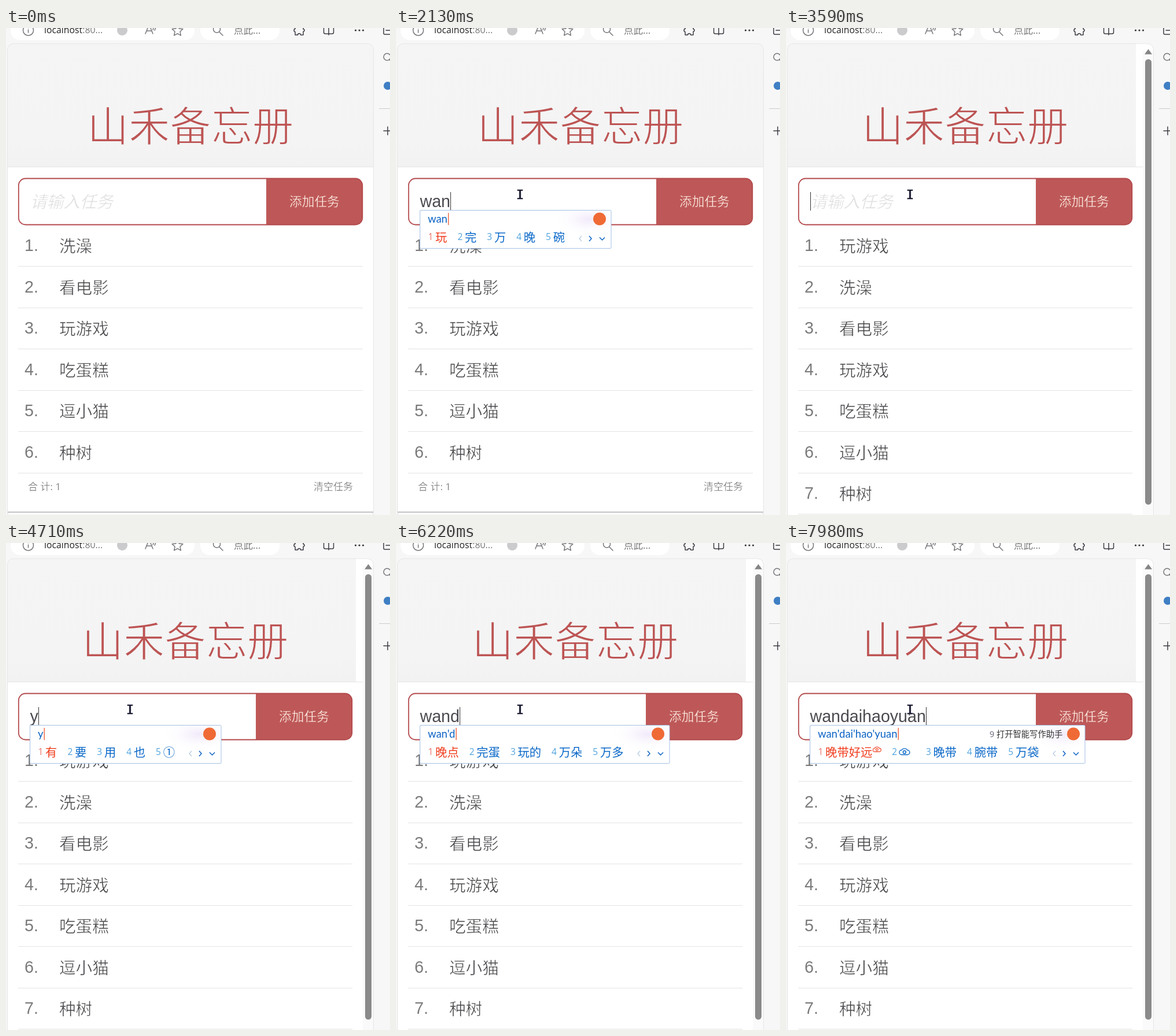
These frames come from a looping animation (664 by 843 pixels, 8 s). An HTML page:

```html
<!DOCTYPE html>
<html lang="zh-CN">
<head>
<meta charset="utf-8">
<title>待办清单</title>
<style>
html, body { margin: 0; width: 100%; height: 100%; overflow: hidden; background: #f7f7f7; }
svg { display: block; width: 664px; height: 843px; }
text { font-family: "Liberation Sans", "Noto Sans CJK SC", "Noto Sans CJK", sans-serif; white-space: pre; }
.cjk { font-family: "Noto Sans CJK SC", "Noto Sans CJK", sans-serif; }
.ui { font-family: "Open Sans", "Noto Sans CJK SC", "Noto Sans CJK", sans-serif; }
.pinyin { font-family: Lato, sans-serif; font-size: 18.5px; fill: #0a62c4; }
.title { font-size: 71.4px; fill: #bd5454; stroke: #f4f4f4; stroke-width: 1.8; text-anchor: middle; }
.item, .hint { font-size: 28.6px; fill: #444448; stroke: #fff; stroke-width: .6; }
.hint { fill: #e0e0e0; stroke-width: .4; font-style: italic; }
.num { font-size: 28.6px; fill: #7b7b7b; }
.typed { font-size: 28.6px; fill: #4a4a50; }
.foot { font-size: 17px; fill: #777; stroke: #fff; stroke-width: .25; }
.add { font-size: 21.7px; fill: #fff3e8; stroke: #be5858; stroke-width: .35; text-anchor: middle; }
.line { fill: none; stroke: #3c3c44; stroke-width: 1.5; stroke-linecap: round; stroke-linejoin: round; }
.soft { stroke: #77777c; }
.cloud { fill: none; stroke: currentColor; stroke-width: 1.4; }
</style>
</head>
<body>
<svg viewBox="0 0 664 843">
  <defs>
    <linearGradient id="head" x2="0" y2="1">
      <stop stop-color="#f5f5f5"/><stop offset=".8" stop-color="#f4f4f4"/><stop offset="1" stop-color="#f2f2f2"/>
    </linearGradient>
    <radialGradient id="glow" cx=".65" cy=".3" r=".6">
      <stop stop-color="#f1e9fa"/><stop offset="1" stop-color="#fff" stop-opacity="0"/>
    </radialGradient>
  </defs>
  <rect width="664" height="843" fill="#f7f7f7"/>
  <g id="toolbar">
    <rect x="8" y="-20" width="318" height="41" rx="16" fill="#fff"/>
    <rect x="336" y="-20" width="137" height="41" rx="16" fill="#fff"/>
    <g class="line soft"><circle cx="38.5" cy="4" r="9"/><path d="M38.500 3v5M38.500 0v.1"/></g>
    <text class="ui" x="66" y="9" font-size="15.8" fill="#222">localhost<tspan fill="#777">:80...</tspan></text>
    <circle cx="201" cy="4" r="9" fill="#cbcbcd"/>
    <path class="line soft" d="M241 10l6-15h1l6 15M243 5h9M253-3q3 3 1 6M256-6q4 5 1 10"/>
    <path class="line soft" d="M296.500-5l2.800 6 6.500.8-4.800 4.500 1.300 6.500-5.800-3.200-5.800 3.200 1.300-6.500-4.800-4.500 6.500-.8z"/>
    <g class="line soft"><circle cx="364.5" cy="2" r="6"/><path d="M369 7l6 6"/></g>
    <text class="ui" x="394" y="10" font-size="16.5" fill="#777">点此...</text>
    <path class="line" d="M500-4V1.500q-2 0-2 2.500t2 2.500V12h4.500q0-2.500 2.500-2.500t2.500 2.500H514V6q2 0 2-2t-2-2V-4"/>
    <path class="line" d="M558-6V12M558 10h-6q-2.500 0-2.500-2.500V-6M558 10h6q2.500 0 2.500-2.500V-6"/>
    <g fill="#333"><circle cx="604.5" cy="4" r="1.6"/><circle cx="611" cy="4" r="1.6"/><circle cx="617.5" cy="4" r="1.6"/></g>
    <path class="line" d="M664 11h-9q-2 0-2-2V-4M657 4h7"/>
  </g>
  <g id="sidebar">
    <g class="line soft"><circle cx="659" cy="50" r="6"/><path d="M663 55l4 4"/></g>
    <circle cx="660" cy="100" r="7" fill="#3f7fc4"/>
    <path d="M645 139.500h19" stroke="#ccc"/>
    <path class="line" d="M653 178h12M660 171v14"/>
  </g>
  <g id="page"></g>
  <g id="pointer"></g>
</svg>
<script>
const LOOP = 8000, ROW = 71.5;
const page = document.getElementById("page");
const pointer = document.getElementById("pointer");
const pen = document.createElement("canvas").getContext("2d");
const FIELD_FONT = '28.6px "Liberation Sans", "Noto Sans CJK SC", "Noto Sans CJK", sans-serif';
const PINYIN_FONT = "18.5px Lato, sans-serif";
const todos = ["洗澡", "看电影", "玩游戏", "吃蛋糕", "逗小猫", "种树"];

// [time, letters, candidates, assistant opacity]; suffix * = cloud, ! = tick; ~ = cloud only, # = sticker
const steps = [
  [0, ""],
  [1950, "w", "我 无 为 问 玩"],
  [2040, "wa", "哇 挖 娃 瓦 蛙"],
  [2130, "wan", "玩 完 万 晚 碗"],
  [2380, "wan'y", "玩游 万一 晚一 万元 玩一"],
  [2750, "wan'yo", "玩哟 万有 晚有 万一 玩一"],
  [2880, "wan'you", "玩游 万有 万友 玩友 晚有"],
  [3080, "wan'you'x", "玩游戏 万有效 万有 万友 #"],
  [3150, "wan'you'xi", "玩游戏 万有效 万有 万友 #"],
  [3220, "玩游戏"],
  [3590, ""],
  [4710, "y", "有 要 用 也 ①"],
  [4890, "yi", "一 以 已 亿 衣"],
  [5260, "y", "有 要 用 也 ①"],
  [5400, ""],
  [5580, "w", "我 无 为 问 玩"],
  [5680, "wa", "哇 挖 娃 瓦 蛙"],
  [5770, "wan", "玩 完 万 晚 碗"],
  [6220, "wan'd", "晚点 完蛋 玩的 万朵 万多"],
  [6280, "wan'da", "完大 晚大 玩大 万朵 万打"],
  [6340, "wan'dai", "晚带 腕带 万袋 网贷 完带"],
  [6540, "wan'dai'h", "晚带很好* ~ 晚带 腕带 万袋"],
  [6630, "wan'dai'ha", "晚带哈哈* ~ 晚带 腕带 万袋"],
  [6720, "wan'dai'hao", "晚带好好* ~ 晚带 腕带 万袋"],
  [7150, "wan'dai'hao'y", "晚带好友 ~ 网贷好友! 晚带 腕带"],
  [7300, "wan'dai'hao'yu", "晚带好雨 ~ 晚带 腕带 万袋"],
  [7380, "wan'dai'hao'yua", "晚带好远 ~ 晚带 腕带 万袋"],
  [7460, "wan'dai'hao'yuan", "晚带好远 ~ 晚带 腕带 万袋"],
  [7840, "wan'dai'hao'yuan", "晚带好远* ~ 晚带 腕带 万袋", .3],
  [7910, "wan'dai'hao'yuan", "晚带好远* ~ 晚带 腕带 万袋", .65],
  [7980, "wan'dai'hao'yuan", "晚带好远* ~ 晚带 腕带 万袋", 1],
];

const within = (t, from, to) => t >= from && t < to;
const text = (cls, x, y, body, extra = "") => `<text class="${cls}" x="${x}" y="${y}" ${extra}>${body}</text>`;
const rect = (x, y, w, h, fill, extra = "") => `<rect x="${x}" y="${y}" width="${w}" height="${h}" fill="${fill}" ${extra}/>`;

function widthOf(body, font) {
  pen.font = font;
  return pen.measureText(body).width;
}

const cloud = (x, y, scale) => `<g class="cloud" transform="translate(${x} ${y}) scale(${scale})">
  <path d="M4 12a4 4 0 0 1 0-8a5.500 4.500 0 0 1 10 0a4 4 0 0 1 0 8z"/><circle cx="9" cy="7.5" r="2.5"/></g>`;

function candidate(token, i, x) {
  const ink = i ? "#0a68c8" : "#f03c1c";
  const numeral = text("ui", x, 367, i + 1, `font-size="15.5" fill="${i ? "#4fa3de" : "#ee7468"}"`);
  const left = x + 12.6;
  let art = "", width;
  if (token === "~") {
    art = cloud(left, 354.5, 1);
    width = 28;
  } else if (token === "#") {
    art = rect(left + 1, 350, 15, 15, "#ddd5d6", 'rx="3"') + rect(left + 14, 351, 16, 14, "#dfb9bd", 'rx="2"')
      + text("ui", left, 374, "吃鸡不来", 'font-size="7" fill="#ccc"')
      + `<path d="M${left + 33} 371h7l-3.500 4z" fill="#4fa3de"/>`;
    width = 40;
  } else {
    const word = token.replace(/[*!]/, "");
    width = word.length * 20.3;
    art = text("cjk", left, 369.5, word, `font-size="20.3" fill="${ink}"`);
    const end = left + width;
    if (token.endsWith("*")) art += cloud(end + 1, 352, .78);
    if (token.endsWith("!")) art += `<g class="cloud"><circle cx="${end + 8}" cy="357" r="5.5"/><path d="M${end + 5} 357l2.500 2.500 5-5"/></g>`;
    if (word !== token) width += 16;
  }
  return { art: `<g color="${ink}">${numeral}${art}</g>`, end: left + width };
}

function popup(letters, list, assist) {
  let x = 55.5, end = 0, words = "";
  list.split(" ").forEach((token, i) => {
    const c = candidate(token, i, x);
    words += c.art;
    end = c.end;
    x = end + 18;
  });
  const right = Math.round(end + 79.5);
  const caret = 56 + widthOf(letters, PINYIN_FONT);
  const chevron = (dx, d, ink) => `<path d="M${right - dx} 364.500${d}" fill="none" stroke="${ink}" stroke-width="1.5"/>`;
  return rect(41.5, 315.5, right - 41.5, 66, "#fff", 'rx="1.5" stroke="#a3c0e4"')
    + rect(right - 108, 316, 107, 50, "url(#glow)")
    + text("pinyin", 55, 337, letters)
    + rect(caret, 320, 1.4, 21, "#f2603c")
    + (assist ? text("ui", right - 165, 336, '<tspan fill="#667">9</tspan> 打开智能写作助手', `font-size="14.3" fill="#333" opacity="${assist}"`) : "")
    + `<circle cx="${right - 20}" cy="330.5" r="11" fill="#ef6a35"/>` + words
    + chevron(51, "m0-4.500l-4 4.500 4 4.500", "#bcd0e4")
    + chevron(38, "m0-4.500l4 4.500-4 4.500", "#0a62c4")
    + chevron(20, "m0-2l4.500 4.500 4.500-4.500", "#0a62c4");
}

function drawPage([, letters, list, assist], long, caretOn) {
  const shift = long ? -18 : 0, right = 617 + shift, split = 450 + shift;
  const items = long ? ["玩游戏", ...todos] : todos;
  const typed = letters.replace(/'/g, "");
  let out = `<path d="M3 843V39q0-12 12-12h608q12 0 12 12v804z" fill="#fff"/>`
    + `<path d="M3 240V39q0-12 12-12h${608 + shift}${long ? "v213" : "q12 0 12 12v201"}z" fill="url(#head)"/>`
    + rect(3, 240, 632 + shift, 1, "#e6e6e6")
    + text("cjk title", 319 + shift / 2, 195.5, "山禾备忘册")
    + `<path d="M${split} 260.500h${right - split - 13}q12 0 12 12v56q0 12-12 12H${split}z" fill="#be5858"/>`
    + rect(21.8, 260.5, right - 22.5, 80, "none", 'rx="12" stroke="#b4494c" stroke-width="1.8"')
    + text("cjk add", 533.5 + shift, 308, "添加任务");
  items.forEach((item, i) => {
    const y = i * ROW;
    out += text("num", 32, 386 + y, `${i + 1}.`) + text("cjk item", 92, 388 + y, item)
      + rect(21, Math.round(412 + y), right - 21, 1, "#e4e4e4");
  });
  if (long) {
    out += rect(617, 40, 18, 803, "#fafafa") + rect(621, 54, 11, 771, "#8a8a8a", 'rx="5.5"')
      + `<path d="M620 45.500l6.500-9 6.500 9z" fill="#858585"/>`;
  } else {
    out += text("ui foot", 38, 800, "合 计: 1") + text("ui foot", 600, 800, "清空任务", 'text-anchor="end"')
      + rect(3, 837, 632, 2, "#c4c4c4") + rect(3, 839, 632, 4, "#f5f5f5") + rect(6, 839, 626, 4, "#fafafa");
  }
  out += `<path d="M2.500 843V39q0-12 12-12h609q12 0 12 12v804" fill="none" stroke="#e6e6e6"/>`;
  out += typed ? text("typed", 41.5, 309.5, typed) : text("cjk hint", 42, 311, "请输入任务");
  if (caretOn) out += rect(Math.round(41.5 + widthOf(typed, FIELD_FONT)), 284, 1, 32, "#333");
  if (list) out += popup(letters, list, assist);
  page.innerHTML = out;
}

const beam = `<path d="M-5-8.500H5V-6H1.700V6H5v2.500H-5V6h3.300V-6H-5z" fill="#16162e" stroke="#fff" stroke-opacity=".7" stroke-width=".6"/>`;
const arrow = `<path d="M0 0v17l4-4 3 7 3-1-3-7h6z" fill="#fff" stroke="#16162e"/>`;

function drawPointer(step) {
  if (step < 0) return void (pointer.innerHTML = "");
  const left = (1 - step / 9) ** 2;
  const x = 214.5 + 245 * left, y = 288 + 457 * left;
  const row = Math.floor((y - 341) / ROW);
  pointer.innerHTML = (row >= 0 ? text("num", 581, 389 + row * ROW, "×", 'text-anchor="middle" style="font-size:34px;fill:#cc9a9a"') : "")
    + `<g transform="translate(${x} ${y})">${row < 0 ? beam : arrow}</g>`;
}

let lastPage, lastStep;
function frame() {
  const t = performance.now() % LOOP;
  const index = steps.findLastIndex(s => s[0] <= t);
  const long = t >= 3590;
  const caretOn = t >= 570 && !within(t, 1070, 1630) && !within(t, 3830, 4330);
  const key = `${index} ${long} ${caretOn}`;
  if (key !== lastPage) drawPage(steps[index], long, caretOn);
  lastPage = key;
  const step = Math.min(9, Math.floor((t - 60) / 64));
  if (step !== lastStep) drawPointer(step);
  lastStep = step;
  requestAnimationFrame(frame);
}
frame();
</script>
</body>
</html>
```
